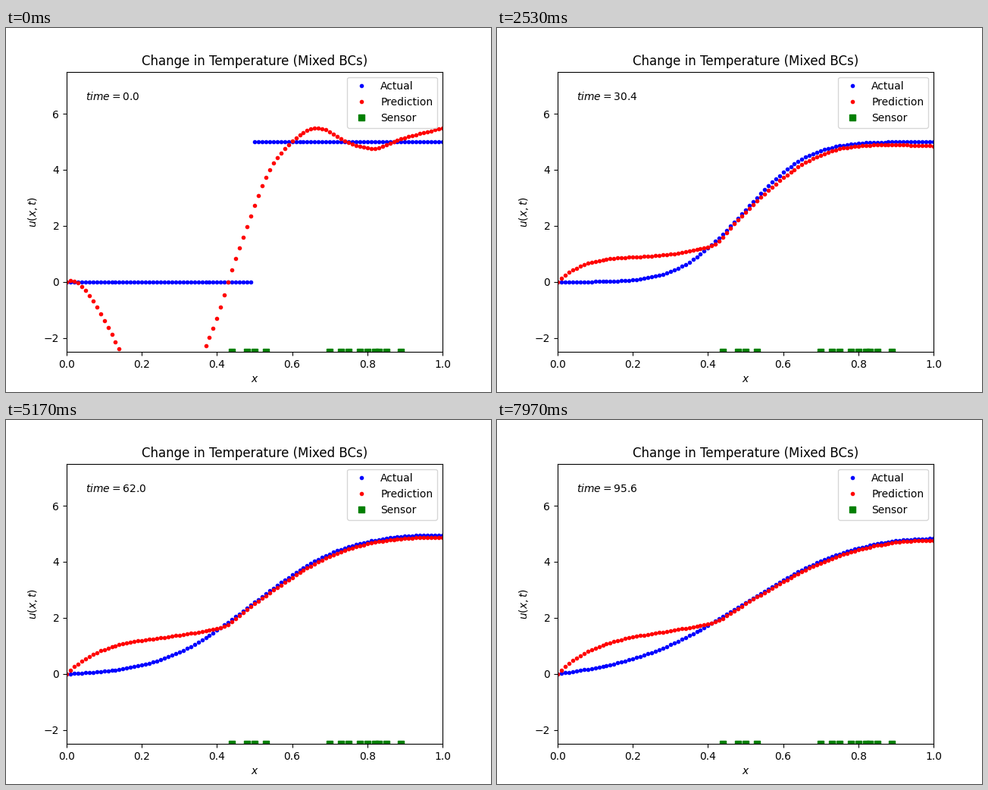
A matplotlib script that plays this animation: 640 px wide and 480 px high, repeating every 8000 ms.

```python
import math

import numpy as np
import matplotlib.pyplot as plt
from matplotlib.animation import FuncAnimation

STEPS = 240
TICKS = STEPS + 1          # the last step is held for one extra tick
LOOP_MS = 8000
DT = 0.4
DIFFUSIVITY = 3e-4

erf = np.vectorize(math.erf)
x = np.linspace(0, 1, 101)
sensors = np.array([0.44, 0.48, 0.50, 0.53, 0.70, 0.73, 0.75,
                    0.78, 0.80, 0.82, 0.83, 0.85, 0.89])


def spread(t):
    return 2 * math.sqrt(DIFFUSIVITY * t) + 1e-6


def step(edge, width):
    """Blurred 0-to-5 step: u = 0 on the left, zero flux on the right."""
    images = (erf((x - edge) / width) + erf((x + edge) / width)
              - erf((x - 2 + edge) / width) - erf((x - 2 - edge) / width))
    return 2.5 * images - 5


def curve(knots, vals):
    """Cubic Hermite curve through a few points, zero before the first."""
    slope = np.gradient(vals, knots)
    i = np.clip(np.searchsorted(knots, x, side="right") - 1,
                0, len(knots) - 2)
    h = knots[i + 1] - knots[i]
    q = (x - knots[i]) / h
    y = ((1 + 2 * q) * (1 - q) ** 2 * vals[i]
         + q * (1 - q) ** 2 * h * slope[i]
         + q * q * (3 - 2 * q) * vals[i + 1]
         + q * q * (q - 1) * h * slope[i + 1])
    return np.where(x < knots[0], 0, y)


# Fixed shapes that make up the reconstruction.
plateau = 2 * (1 - np.exp(-x / 0.14)) + 20 * x ** 6
dip = 1.25 * np.sin(np.pi * np.clip(x / 0.53, 0, 1)).clip(0) ** 1.5
ringing = curve(np.array([0.44, 0.50, 0.58, 0.67, 0.76, 0.82, 0.88, 1]),
                np.array([0, 0.23, 0.15, 0.50, -0.08, -0.24, 0.06, 0.49]))
sag = np.clip((x - 0.75) / 0.25, 0, 1)
right_side = 1 / (1 + np.exp(-(x - 0.435) / 0.012))


def actual_at(t):
    return step(0.495, spread(t))


def predicted_at(t):
    lag = t * math.exp(-t / 20)
    left = plateau - dip * 4.6 / (1 + t / 4) - 0.8 * x ** 3 * lag
    right = (step(0.5, spread(t) + 0.08 / (1 + t / 14))
             + ringing * math.exp(-t / 2.5) - 0.022 * sag * lag)
    return left + (right - left) * right_side


fig, ax = plt.subplots(figsize=(6.4, 4.8), dpi=100)
ax.set(xlim=(0, 1), ylim=(-2.5, 7.5), xlabel="$x$", ylabel="$u(x,t)$",
       title="Change in Temperature (Mixed BCs)")
actual, = ax.plot([], [], "b.", label="Actual")
prediction, = ax.plot([], [], "r.", label="Prediction")
ax.plot(sensors, np.full(len(sensors), -2.5), "gs", label="Sensor")
clock = ax.text(0.05, 6.5, "")
ax.legend(loc="upper right")


def update(n):
    t = min(n, STEPS - 1) * DT
    actual.set_data(x, actual_at(t))
    prediction.set_data(x, predicted_at(t))
    clock.set_text(f"$time = {t:.1f}$")
    return actual, prediction, clock


anim = FuncAnimation(fig, update, frames=TICKS, interval=LOOP_MS / TICKS,
                     repeat=True, repeat_delay=0)
plt.show()
```
